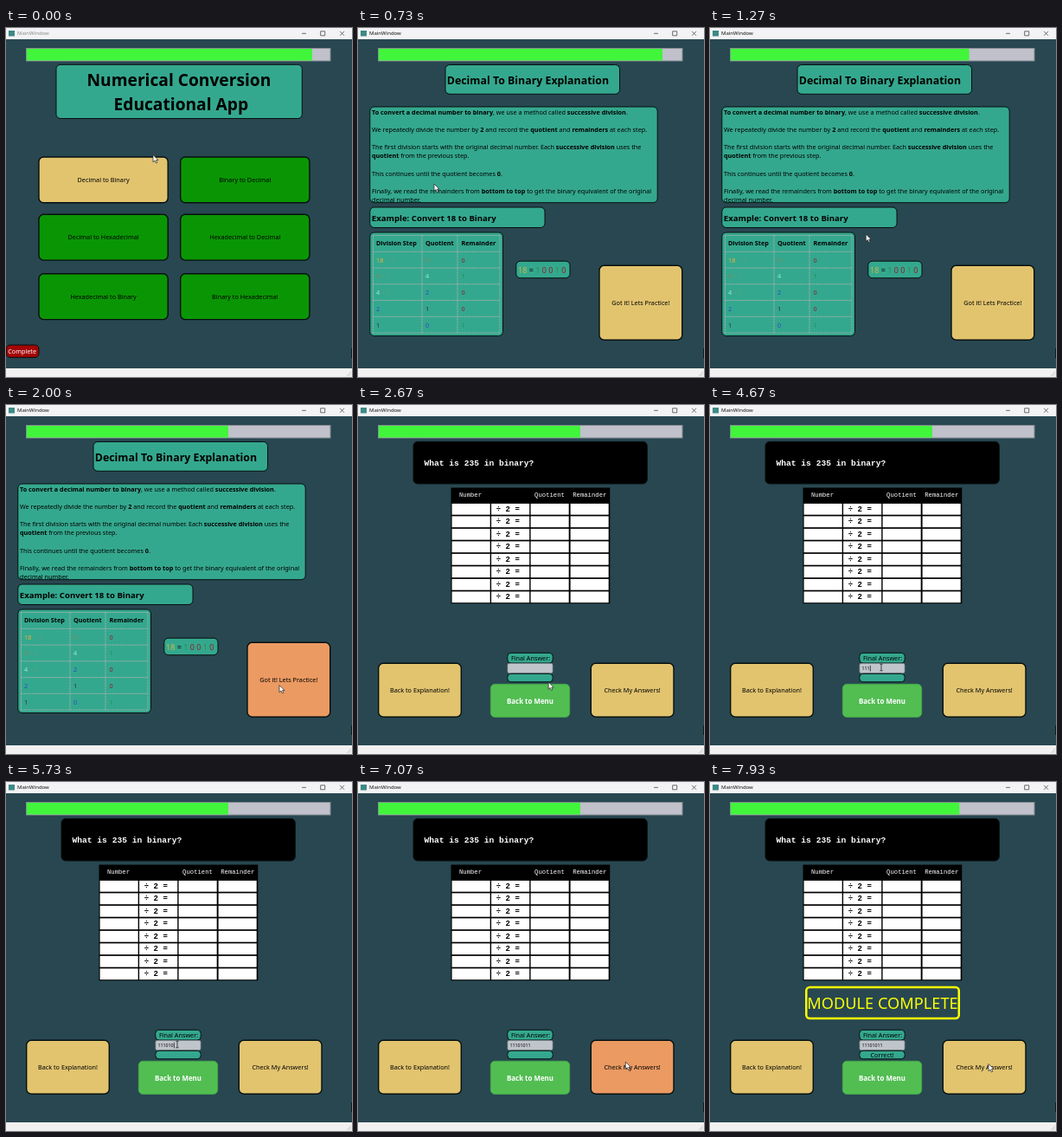
Write an HTML page that moves like this. It is 400 px wide and 403 px high and loops after 8 s.

```html
<!DOCTYPE html>
<html lang="en">
<head>
<meta charset="utf-8">
<title>Numerical Conversion</title>
<style>
html, body { margin: 0; width: 100%; height: 100%; overflow: hidden; background: #284751; }
svg { display: block; width: 100%; height: 100%; }
text { font-family: "Noto Sans", "Open Sans", sans-serif; font-size: 7.25px; white-space: pre; }
.mono { font-family: "Liberation Mono", monospace; }
.b { font-weight: 700; }
.mid { text-anchor: middle; }
</style>
</head>
<body>
<svg id="stage" viewBox="0 0 400 403" preserveAspectRatio="none"></svg>
<script>
const LOOP = 8000;
const TEAL = '#34a88e', SAND = '#e2c46f', ORANGE = '#eb9a62', GREEN = '#0a9604', INK = '#06100f';
const stage = document.getElementById('stage');

const rect = (x, y, x2, y2, fill, opt = '') =>
  `<rect x="${x}" y="${y}" width="${x2 - x}" height="${y2 - y}" fill="${fill}" ${opt}/>`;
const panel = (x, y, x2, y2, fill = TEAL, r = 5, w = 1, id = '') =>
  rect(x, y, x2, y2, fill, `rx="${r}" stroke="${INK}" stroke-width="${w}" ${id && `id="${id}"`}`);
const text = (x, y, s, opt = '') => `<text x="${x}" y="${y}" ${opt}>${s}</text>`;
const sized = (px, cls = '') => `class="${cls}" style="font-size:${px}px"`;
const bold = s => `<tspan class="b">${s}</tspan>`;
const tint = (s, c) => `<tspan fill="${c}">${s}</tspan>`;
const button = (x, y, x2, y2, label, fill = SAND, id = '') =>
  panel(x, y, x2, y2, fill, 5.5, 1.4, id) +
  text((x + x2) / 2, (y + y2) / 2 + 2.7, label, 'class="mid"');
const group = (id, body) => `<g id="${id}">${body}</g>`;

function chrome() {
  return rect(0, 0, 400, 403, '#284751') +
    rect(0, 0, 400, 13, '#f3f3f5') +
    rect(3, 3, 10, 9.5, '#3c8a86') +
    text(13, 8.3, 'MainWindow', 'id="caption" style="font-size:6px"') +
    `<path d="M342 6.3h5M363.7 3.8h5v5h-5zM386 3.8l5 5m0-5l-5 5" fill="none" stroke="#333" stroke-width=".7"/>` +
    rect(0, 393, 400, 403, '#f1f1f1') +
    `<path d="M394 402l5-5M396.500 402l2.500-2.500" stroke="#bbb" stroke-width=".8"/>` +
    rect(399, 370, 400, 381, '#101a1e') +
    rect(23.500, 23.500, 375, 38, '#c0c1ca', 'stroke="#858b91"') +
    rect(24, 24, 354, 37.5, '#40f53a', 'id="fill"');
}

function menu() {
  const labels = ['Decimal to Binary', 'Binary to Decimal', 'Decimal to Hexadecimal',
    'Hexadecimal to Decimal', 'Hexadecimal to Binary', 'Binary to Hexadecimal'];
  const tops = [149, 215.3, 283.8];
  const tiles = labels.map((s, i) => {
    const x = i % 2 ? 201.7 : 38, y = tops[i >> 1];
    return button(x, y, x + 149.2, y + 52.8, s, i ? GREEN : SAND, i ? '' : 'first');
  });
  return panel(58, 42.3, 342.3, 104.5) +
    text(93.5, 66.5, 'Numerical Conversion', sized(19.2, 'b')) +
    text(124.5, 95.3, 'Educational App', sized(19.2, 'b')) +
    tiles.join('') +
    panel(0.3, 366, 38, 380.4, '#a30505', 4.5) +
    text(2.2, 376, 'Complete', 'fill="#fff"');
}

function lesson() {
  const lines = [
    [100, bold('To convert a decimal number to binary') + ', we use a method called ' + bold('successive division') + '.'],
    [120, `We repeatedly divide the number by ${bold(2)} and record the ${bold('quotient')} and ${bold('remainders')} at each step.`],
    [140, `The first division starts with the original decimal number. Each ${bold('successive division')} uses the`],
    [150.300, bold('quotient') + ' from the previous step.'],
    [170.500, `This continues until the quotient becomes ${bold(0)}.`],
    [190.800, `Finally, we read the remainders from ${bold('bottom to top')} to get the binary equivalent of the original`],
    [200.800, 'decimal number.']
  ];
  const cols = [21, 78, 119.5];
  const hue = { 18: '#e3b03c', 9: '#8d8067', 4: '#98ead2', 2: '#2a4bc8', 1: '#2f2a50' };
  const red = '#8c2028', lime = '#2a8f48';
  let rows = ['Division Step', 'Quotient', 'Remainder']
    .map((s, i) => text(cols[i], 251.3, s, 'class="b"')).join('');
  for (let n = 18, y = 270.7; n > 0; n >>= 1, y += 18.7) {
    const q = n >> 1, rem = n % 2;
    const step = tint(n, hue[n]) + (n > 2 ? tint(' ÷ 2', '#569f80') : '');
    rows += text(cols[0], y, step) + text(cols[1], y, q, `fill="${hue[q] || '#2a4bc8'}"`) +
      text(cols[2], y, rem, `fill="${rem ? lime : red}"`);
  }
  let grid = 'M17.5 239.500H164M17.5 239.500V352M74 239.500V352M115 239.500V352M164 239.500V352';
  for (let i = 0; i < 6; i++) grid += `M17.5 ${258.3 + i * 18.75}H164`;
  const bits = [...(18).toString(2)].map(b => tint(' ' + b, b > 0 ? lime : red)).join('');
  return panel(101, 42.5, 302.5, 76.3) +
    text(102.8, 64.8, 'Decimal To Binary Explanation', sized(12.35, 'b')) +
    panel(13.8, 91, 346.2, 201.7) +
    lines.map(([y, s]) => text(16, y, s)).join('') +
    panel(13.8, 207, 216, 230.5) +
    text(15.8, 222.500, 'Example: Convert 18 to Binary', sized(9.6, 'b')) +
    panel(13.8, 236, 167.5, 355.6) +
    `<path d="${grid}" fill="none" stroke="#d5b5b5" stroke-width=".7" stroke-dasharray="2 1"/>` + rows +
    panel(182.8, 269.2, 245, 288.7) +
    text(185, 282.5, tint(18, '#d3b545') + ' =' + bits, sized(9)) +
    button(279, 274.3, 374.7, 360.2, 'Got it! Lets Practice!', SAND, 'go');
}

function practice() {
  const xs = [108, 153.500, 199, 245], row = 14.5;
  let table = rect(107.5, 95.5, 291.3, 229.3, '#000');
  [['Number', 130], ['Quotient', 221.5], ['Remainder', 267.8]].forEach(([s, x]) => {
    table += text(x, 106, s, 'fill="#fff" ' + sized(7.25, 'mono mid'));
  });
  for (let i = 0; i < 8; i++) {
    const y = 113.4 + i * row;
    xs.forEach(x => table += rect(x + .6, y + .5, x + 44.700, y + row - 1.2, '#fff'));
    table += text(159.8, y + 9.5, '÷ 2 =', sized(9, 'mono b'));
  }
  return panel(64, 42.3, 334.3, 91, '#000') +
    text(76.5, 69.500, 'What is 235 in binary?', 'fill="#fff" ' + sized(9.62, 'mono b')) +
    table +
    panel(172.8, 286.3, 225.2, 298, TEAL, 4) +
    text(199.5, 294.9, 'Final Answer:', 'class="mid"') +
    rect(172.8, 298.3, 225.2, 309.8, '#c0c5cb', 'rx="2" stroke="#59656b" stroke-width=".6"') +
    text(175.6, 306.3, '', 'id="answer" style="font-size:5.25px"') +
    rect(0, 300.8, .7, 307.5, '#111', 'id="caret"') +
    panel(172.8, 310.3, 225.2, 319.8, TEAL, 4) +
    rect(153.3, 322.3, 244.700, 360.4, '#52be52', 'rx="5" stroke="#43a648"') +
    text(199, 344.6, 'Back to Menu', 'fill="#fff" ' + sized(7.9, 'b mid')) +
    button(23.7, 298.300, 119.3, 360.2, 'Back to Explanation!') +
    button(269.300, 298.300, 365, 360.2, 'Check My Answers!', SAND, 'check') +
    group('done',
      text(199, 317.700, 'Correct!', 'class="mid"') +
      rect(111.3, 237, 287.8, 273, 'none', 'rx="4" stroke="#fbff06" stroke-width="2.5"') +
      text(199.500, 262.300, 'MODULE COMPLETE', 'fill="#fbff06" ' + sized(18.2, 'mid')));
}

const pointer =
  group('arrow', '<path d="M0 0V8.300L2 6.500 3.400 9.500 4.800 8.900 3.500 6H6z" fill="#fff" stroke="#222" stroke-width=".7"/>') +
  group('beam', '<path d="M-1.600 -3.800H1.600M0 -3.800V3.800M-1.600 3.800H1.600" stroke="#222" stroke-width=".8"/>');

stage.innerHTML = chrome() + group('menu', menu()) + group('lesson', lesson()) +
  group('practice', practice()) + group('pointer', pointer);

const el = {};
stage.querySelectorAll('[id]').forEach(e => el[e.id] = e);
const show = (e, on) => e.setAttribute('display', on ? 'inline' : 'none');
const clamp = v => Math.min(1, Math.max(0, v));
const smooth = v => v * v * (3 - 2 * v);

const OPEN = 660, START = 2330, FOCUS = 3400, CHECK = 7400, RELEASE = 7530;
const ANSWER = (235).toString(2);
const KEYS = [3900, 4200, 4500, 4850, 5200, 5550, 5950, 6250];
// Pointer moves: start, end, target x, target y
const MOVES = [[70, 560, 88, 180], [800, 1880, 316, 323.500], [2360, 2680, 220, 320],
  [2680, 3150, 198, 303], [6550, 7200, 322, 325.500]];

function pointerAt(t) {
  let x = 170, y = 146.500;
  for (const [a, b, tx, ty] of MOVES) {
    const k = smooth(clamp((t - a) / (b - a)));
    x += (tx - x) * k;
    y += (ty - y) * k;
  }
  return [x, y];
}

function draw(t) {
  const [x, y] = pointerAt(t);
  const page = t < OPEN ? 'menu' : t < START ? 'lesson' : 'practice';
  for (const p of ['menu', 'lesson', 'practice']) show(el[p], p === page);
  el.caption.setAttribute('fill', t < OPEN ? '#8a8a8a' : '#111');

  const edge = 354 - 97 * clamp((t - 710) / 1000) + 59 * clamp((t - CHECK) / 1000);
  el.fill.setAttribute('width', edge - 24);

  el.go.setAttribute('fill', x > 279 && y > 274 ? ORANGE : SAND);
  el.check.setAttribute('fill', t > 6600 && t < RELEASE && x > 269 && y > 298 ? ORANGE : SAND);
  show(el.done, t >= CHECK);

  const typed = KEYS.filter(k => t >= k);
  el.answer.textContent = ANSWER.slice(0, typed.length);
  const since = t - (typed.length ? typed[typed.length - 1] : FOCUS);
  show(el.caret, t >= FOCUS && t < CHECK && since % 1060 < 530);
  el.caret.setAttribute('x', 175.900 + typed.length * 5.25 * .572);

  const inField = page === 'practice' && x > 173 && x < 225 && y > 298 && y < 310;
  show(el.beam, inField);
  show(el.arrow, !inField);
  el.pointer.setAttribute('transform', `translate(${x} ${y})`);
}

const began = performance.now();
function tick() {
  draw((performance.now() - began) % LOOP);
  requestAnimationFrame(tick);
}
draw(0);
requestAnimationFrame(tick);
</script>
</body>
</html>
```
